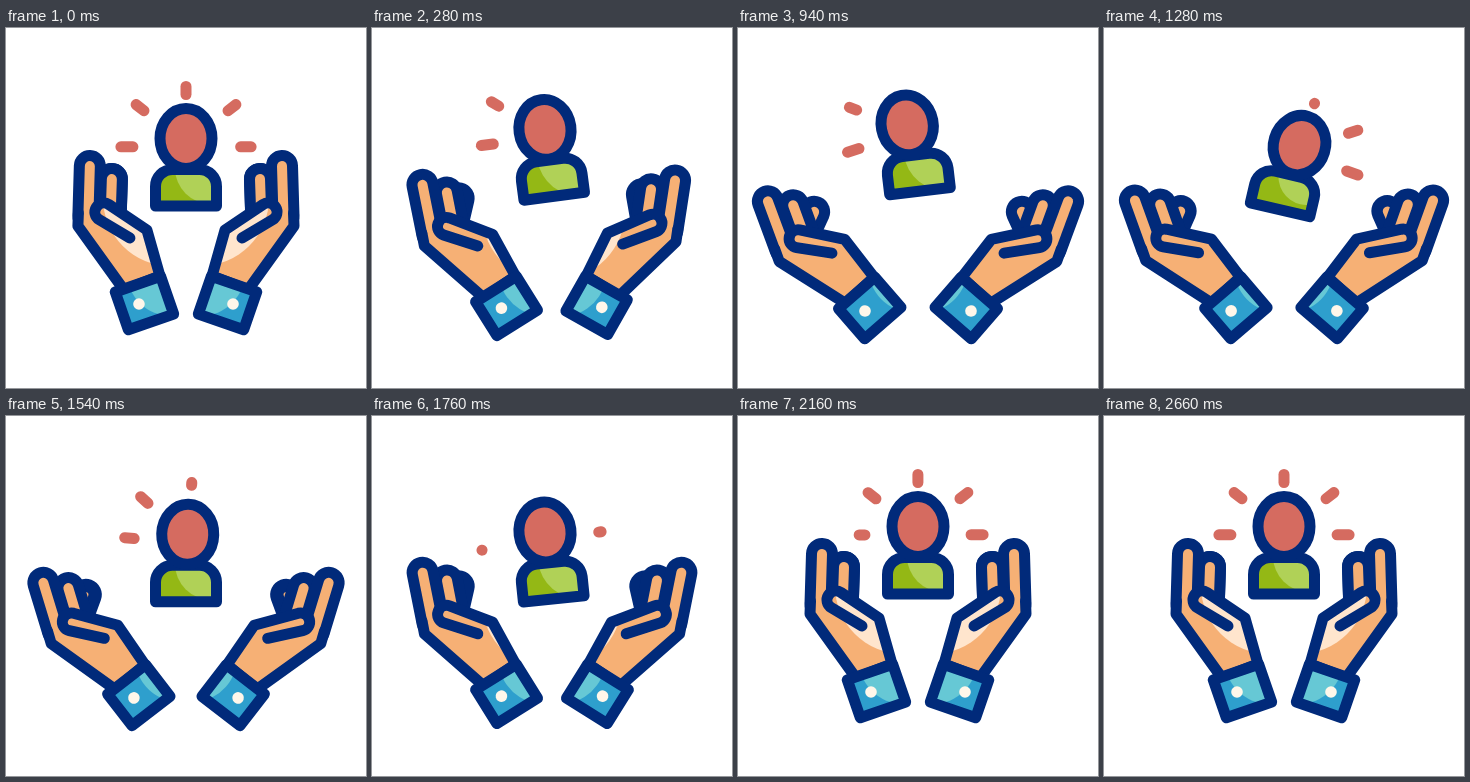
Animation of 360 by 360 pixels, one loop 2820 ms. Source, as an HTML page with a canvas:

```html
<!DOCTYPE html>
<html lang="en">
<head>
<meta charset="utf-8">
<title>Caring hands</title>
<style>
  html, body { margin: 0; width: 100%; height: 100%; overflow: hidden; background: #fff; }
  canvas { display: block; width: 360px; height: 360px; }
</style>
</head>
<body>
<canvas id="stage" width="360" height="360"></canvas>
<script>
const ctx = document.getElementById('stage').getContext('2d');
const LOOP = 2820, NAVY = '#012a7a', PEACH = '#f6b075', CREAM = '#ffe5cd', RED = '#d56b60';
const DEG = Math.PI / 180;
const clamp = v => Math.max(0, Math.min(1, v));
const mix = (a, b, p) => a + (b - a) * p;

// Cosine easing through [time, value] keys
function track(keys, t) {
  const next = keys.findIndex(k => t < k[0]);
  if (next < 1) return keys.at(next)[1];
  const [t0, v0] = keys[next - 1], [t1, v1] = keys[next];
  return mix(v0, v1, (1 - Math.cos(Math.PI * (t - t0) / (t1 - t0))) / 2);
}

function group(x, y, angle, paint) {
  ctx.save();
  ctx.translate(x, y);
  ctx.rotate(angle);
  paint();
  ctx.restore();
}

function line(...points) {
  ctx.beginPath();
  points.forEach(q => ctx.lineTo(...q));
}

function stroke(color, width) {
  ctx.strokeStyle = color;
  ctx.lineWidth = width;
  ctx.stroke();
}

function fill(color) {
  ctx.fillStyle = color;
  ctx.fill();
}

function disc(x, y, r, color) {
  ctx.beginPath();
  ctx.arc(x, y, r, 0, 7);
  fill(color);
}

// Fills the current path and lays a round highlight inside it
function shaded(color, light, x, y, r) {
  fill(color);
  ctx.save();
  ctx.clip();
  disc(x, y, r, light);
  ctx.restore();
}

function finger(tip, base, inner = 10) {
  line(tip, base);
  stroke(NAVY, 32);
  stroke(PEACH, inner);
}

function palm() {
  line([-60.5, -91], [-61, -78], [-15, -14], [21, -28], [8, -74]);
  ctx.arc(-35, -92, 9, -58 * DEG, 122 * DEG, true);
}

function sleeve() {
  group(5.5, -1, -19 * DEG, () => {
    ctx.beginPath();
    ctx.rect(-24, -20, 48, 40);
  });
}

// The hand turns around its button; the last finger fans out from behind the middle one
function drawHand(open) {
  group(133 - 6 * open, 276 + 7 * open, -22 * DEG * open, () => {
    finger([-27 + 17 * open, -125 + 14 * open], [-28, -94], 10 * open ** 4 + 0.01);
    finger([-27, -125], [-28, -96]);
    finger([-49, -138], [-50.5, -88]);
    palm();
    shaded(PEACH, CREAM, 32 + 62 * open, -106 + 42 * open, 68);
    palm();
    ctx.lineTo(-9, -66);
    stroke(NAVY, 11);
    sleeve();
    shaded('#2e9fcd', '#66c8d5', 32 + 28 * open, -32 + 10 * open, 44);
    sleeve();
    stroke(NAVY, 11);
    disc(0, 0, 5.8, '#fff7ea');
  });
}

// Rays sit on an arc over the head; each sweep grows them from right to left, then shrinks them
function drawRays(t) {
  for (let i = 0; i < 5; i++) {
    const side = 2 - i, theta = side * 50 * DEG, half = 4 + Math.abs(side);
    const dir = Math.max(-90, Math.min(90, side * 52)) * DEG;
    group(60 * Math.sin(theta), -48 * Math.cos(theta), dir, () => {
      for (let n = 0; n < 4; n++) {
        const age = t + 212 - 651 * n - 93 * i;
        const tail = n === 3 ? 0 : clamp((age - 200) / 100);
        const head = n === 0 ? 1 : clamp(age / 100);
        if (tail >= 1 || head <= 0) continue;
        line([0, mix(half, -half, tail)], [0, mix(half, -half, head)]);
        stroke(RED, 11);
      }
    });
  }
}

const swing = t => track([[60, 0], [660, -25], [1240, 13.5], [1720, -6], [2140, 0]], t);
const height = t => track([[0, 178], [640, 154], [1480, 186], [2140, 178]], t);

function torso() {
  ctx.beginPath();
  ctx.roundRect(-30.5, -36.5, 61, 36.5, [17, 17, 0, 0]);
}

// Head and rays follow the body's swing with a growing delay
function drawPerson(t) {
  const tilt = swing(t), lean = swing(t - 20) * 1.25 * DEG, trail = swing(t - 50) * 1.47 * DEG;
  const x = 180 - tilt * 0.3, y = height(t);
  const headX = x + 67.5 * Math.sin(lean), headY = y - 67.5 * Math.cos(lean);
  group(x, y, tilt * DEG, () => {
    torso();
    shaded('#94b815', '#b0d157', 25 - tilt * 0.5, -38, 36 - tilt * 0.6);
    torso();
    stroke(NAVY, 11);
  });
  group(headX, headY, lean, () => {
    ctx.beginPath();
    ctx.ellipse(0, 0, 26, 30, 0, 0, 7);
    fill(RED);
    stroke(NAVY, 11);
  });
  group(headX, headY, trail, () => drawRays(t));
}

// Hands fly open from the given start, peak, and close again
function openness(t, start) {
  const peak = 1020, span = t < peak ? peak - start : peak;
  return 1 - Math.min(1, Math.abs(t - peak) / span) ** 2.8;
}

function draw() {
  const t = performance.now() % LOOP;
  ctx.fillStyle = '#fff';
  ctx.fillRect(0, 0, 360, 360);
  ctx.lineCap = ctx.lineJoin = 'round';
  drawHand(openness(t, 0));
  ctx.save();
  ctx.translate(360, 0);
  ctx.scale(-1, 1);
  drawHand(openness(t, 90));
  ctx.restore();
  drawPerson(t);
  requestAnimationFrame(draw);
}
draw();
</script>
</body>
</html>
```
